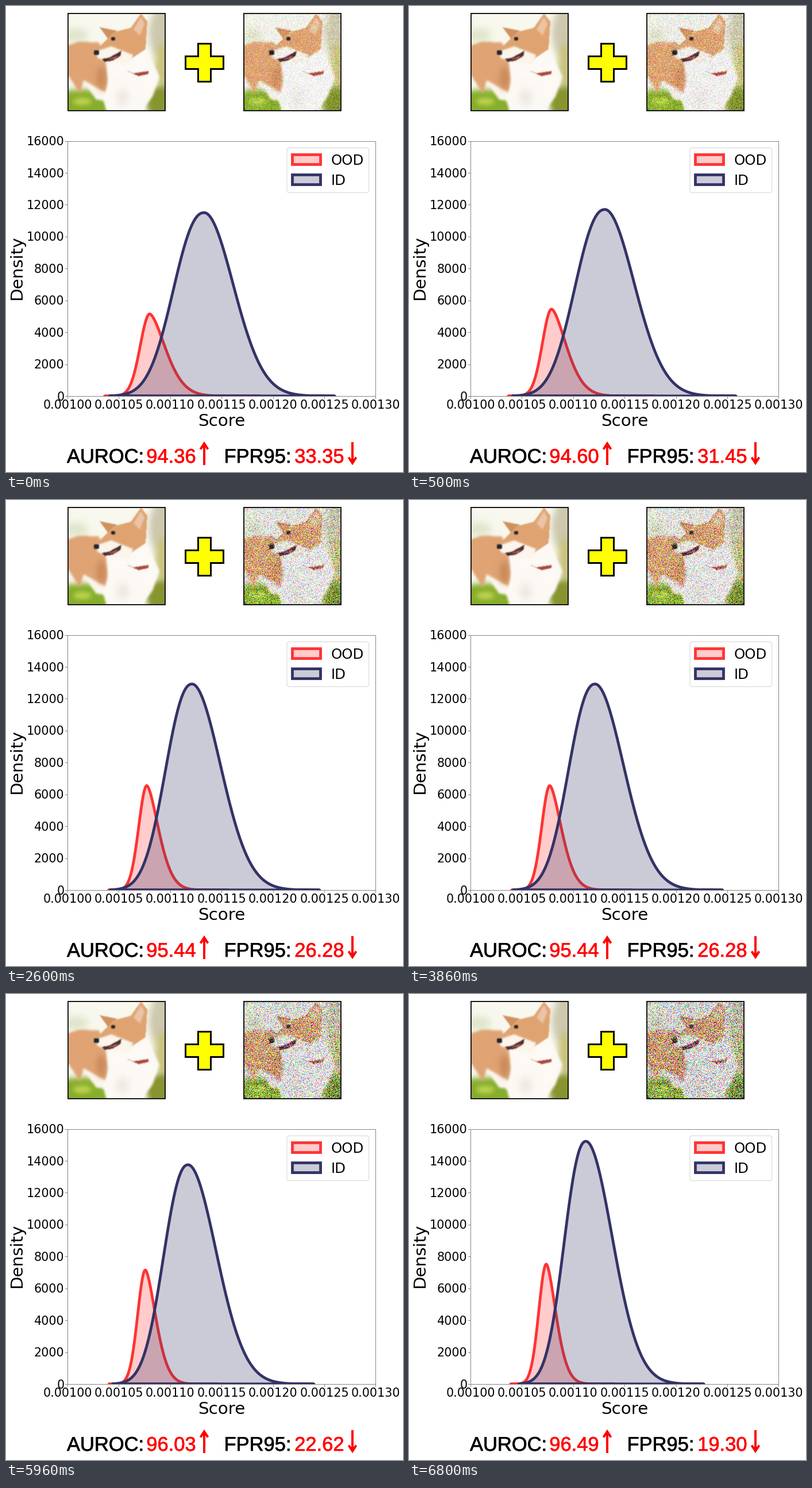
Animation, 691 px wide and 810 px high, one loop 8 s. Source, as a matplotlib script:

```python
import matplotlib.pyplot as plt
import numpy as np
from matplotlib.animation import FuncAnimation
from matplotlib.colors import to_rgb, to_rgba
from matplotlib.patches import FancyBboxPatch, Polygon, Rectangle
from matplotlib.path import Path
from matplotlib.patheffects import withStroke

WIDTH, HEIGHT, DPI = 691, 810, 64
PX = 72 / DPI  # points per pixel
INTERVAL, LOOP = 100, 8000
LEFT, RIGHT, TOP, BASE = 107, 643.5, 234.5, 678
MAX_SCORE, MAX_DENSITY = 300, 16000  # scores in millionths above 0.001
RED, NAVY, GRAY = "#ff3333", "#333366", "#858585"
PHOTO = 168

# start ms, AUROC, FPR95, OOD peak (score, density), ID peak (score, density)
STAGES = [
    (0, 94.36, 33.35, (80.0, 5150), (133.1, 11500)),
    (500, 94.60, 31.45, (78.9, 5450), (130.9, 11700)),
    (2600, 95.44, 26.28, (77.2, 6550), (121.3, 12920)),
    (4700, 96.03, 22.62, (75.8, 7150), (117.4, 13750)),
    (6800, 96.49, 19.30, (73.8, 7520), (112.4, 15220)),
]


def bell(peak, area, left_share, powers, reach):
    """Skewed bell whose half-height width follows from its area and height."""
    center, height = peak
    width = area / height
    left, right = width * left_share, width * (1 - left_share)
    score = np.linspace(center - reach[0] * left, center + reach[1] * right, 400)
    offset = score - center
    side = offset > 0
    ratio = np.abs(offset) / np.where(side, right, left)
    value = height * 0.5 ** (ratio ** np.where(side, powers[1], powers[0]))
    return np.column_stack([LEFT + (RIGHT - LEFT) * score / MAX_SCORE,
                            BASE + (TOP - BASE) * value / MAX_DENSITY])


def blur(mask, sigma):
    r = int(3 * sigma) + 1
    kernel = np.exp(-0.5 * (np.arange(-r, r + 1) / sigma) ** 2)
    kernel /= kernel.sum()
    for axis in (0, 1):
        pad = [(r, r) if a == axis else (0, 0) for a in (0, 1)]
        mask = np.apply_along_axis(np.convolve, axis, np.pad(mask, pad, "edge"),
                                   kernel, "valid")
    return mask


def paint_dog():
    """A dog on grass, in soft flat shapes on a square of PHOTO pixels."""
    v, u = np.mgrid[0:PHOTO, 0:PHOTO] + 0.5
    grid = np.column_stack([u.ravel(), v.ravel()])
    image = np.ones((PHOTO, PHOTO, 3)) * to_rgb("#f8f8ee")

    def shape(color, points, soft=1.0):
        mask = Path(points).contains_points(grid).reshape(PHOTO, PHOTO).astype(float)
        mask = blur(mask, soft)[..., None]
        image[:] = image * (1 - mask) + np.array(to_rgb(color)) * mask

    def oval(color, x, y, rx, ry, soft=1.0):
        a = np.linspace(0, 2 * np.pi, 40)
        shape(color, np.column_stack([x + rx * np.cos(a), y + ry * np.sin(a)]), soft)

    # Garden
    oval("#dfe6cc", 14, 38, 20, 12, 6)
    oval("#cdc8ae", 158, 34, 18, 40, 6)
    oval("#c8c27c", 164, 92, 14, 40, 6)
    oval("#86ad2c", 26, 156, 70, 24, 5)
    oval("#87942f", 160, 152, 26, 26, 5)
    oval("#c3d650", 24, 153, 16, 6, 4)

    # Body and chest
    shape("#fbf6ee", [(22, 112), (66, 112), (74, 152), (48, 150)], 2)
    shape("#e0a474", [(-3, 56), (18, 49), (52, 50), (70, 80), (66, 138), (26, 116),
                      (20, 140), (-3, 104)], 2)
    oval("#c98a5a", 57, 112, 8, 20, 5)
    shape("#fdfaf6", [(64, 80), (132, 54), (158, 110), (146, 144), (128, 170),
                      (66, 170), (60, 150), (70, 120)], 2)
    oval("#ece6de", 94, 146, 10, 16, 7)

    # Head
    shape("#d0915e", [(54, 24), (84, 30), (70, 46)])
    shape("#dfa472", [(46, 66), (66, 46), (80, 32), (108, 25), (126, 0), (137, 14),
                      (134, 62), (104, 82), (64, 80)])
    shape("#ecc5a8", [(113, 28), (126, 6), (132, 18), (124, 38)], 1.5)
    shape("#fbf5ec", [(48, 66), (74, 57), (112, 72), (108, 88), (70, 86), (50, 77)], 1.5)
    shape("#4a2a28", [(58, 79), (70, 77), (92, 65), (90, 74), (76, 82), (62, 84)])
    shape("#c4645c", [(68, 80), (86, 73), (80, 79)])
    oval("#22242c", 48.5, 68, 5, 4.5)
    oval("#2b2220", 77.5, 44, 4, 3.5)
    shape("#a8473c", [(100, 99), (113, 104), (139, 100), (139, 105), (122, 109)])
    return np.clip(image, 0, 1)


fig = plt.figure(figsize=(WIDTH / DPI, HEIGHT / DPI), dpi=DPI, facecolor="white")
ax = fig.add_axes([0, 0, 1, 1])


def text(x, y, label, size, **style):
    style = {"family": "DejaVu Sans", "va": "baseline", **style}
    return ax.text(x, y, label, fontsize=size * PX, **style)


def score_text(x, label="", color="black"):
    return text(x, 794, label, 34.5, family="Liberation Sans", color=color,
                path_effects=[withStroke(linewidth=0.7 * PX, foreground=color)])


def line(points, color, width, **style):
    ax.plot(*zip(*points), color=color, lw=width * PX, **style)


def photo(x, y, pixels):
    image = ax.imshow(pixels, extent=(x, x + PHOTO, y + PHOTO, y),
                      interpolation="nearest", aspect="auto", zorder=1)
    ax.add_patch(Rectangle((x - 0.5, y - 0.5), PHOTO + 1, PHOTO + 1,
                           fill=False, ec="black", lw=1.8 * PX, zorder=2))
    return image


def filled(patch, color):
    patch.set(facecolor=to_rgba(color, 0.25), edgecolor=color, linewidth=4.8 * PX)
    return ax.add_patch(patch)


def density(color):
    curve = Polygon([(LEFT, BASE), (RIGHT, BASE)], joinstyle="round", zorder=3)
    filled(curve, color).set_clip_path(plot_area)
    return curve


# Pictures and plus sign
dog = paint_dog()
grain = np.random.default_rng(7).normal(size=dog.shape)
photo(109, 13, dog)
noisy_photo = photo(414.5, 13, dog)
arm, tip = 11, 33
corner = [(arm, tip), (arm, arm), (tip, arm)]
plus = [(345.5 + sx * x, 97.5 + sy * y)
        for sx, sy, step in ((1, 1, 1), (1, -1, -1), (-1, -1, 1), (-1, 1, -1))
        for x, y in corner[::step]]
ax.add_patch(Polygon(plus, fc="#ffff00", ec="black", lw=3 * PX))

# Chart
plot_area = ax.add_patch(Rectangle((LEFT, TOP), RIGHT - LEFT, BASE - TOP,
                                   fill=False, ec=GRAY, lw=PX, zorder=4))
ood_curve, id_curve = density(RED), density(NAVY)
for k in range(9):
    y = BASE + (TOP - BASE) * k / 8
    line([(LEFT - 4, y), (LEFT, y)], GRAY, 1)
    text(101.5, y + 7.6, str(2000 * k), 20.8, ha="right")
for k in range(7):
    x = LEFT + (RIGHT - LEFT) * k / 6
    line([(x, BASE), (x, BASE + 4)], GRAY, 1)
    text(x, 700.5, f"{0.001 + 0.00005 * k:.5f}", 20.8, ha="center")
text(375.3, 729.5, "Score", 29.4, ha="center")
text(27, 455, "Density", 29.4, ha="center", rotation=90, rotation_mode="anchor")

# Legend
ax.add_patch(FancyBboxPatch((493, 250.5), 134.5, 70, boxstyle="round,pad=4,rounding_size=4",
                            fc="white", ec="#d8d8d8", lw=1.1 * PX, zorder=4))
for label, color, y in (("OOD", RED, 257.5), ("ID", NAVY, 292.5)):
    filled(Rectangle((498.5, y), 48.5, 17.5, zorder=5), color)
    text(565.5, y + 18.5, label, 24.5, zorder=5)

# Scores
score_text(106, "AUROC:")
score_text(379.5, "FPR95:")
auroc_text = score_text(244.3, color="red")
fpr_text = score_text(502.2, color="red")
for x, tail, head in ((345, 797.5, 760.5), (603, 758, 794.5)):
    wing = head + (10 if tail > head else -10)
    for points in ([(x, tail), (x, head)],
                   [(x - 6.5, wing), (x, head), (x + 6.5, wing)]):
        line(points, "red", 4, solid_capstyle="butt", solid_joinstyle="miter")

ax.set(xlim=(0, WIDTH), ylim=(HEIGHT, 0))
ax.axis("off")


def scene(auroc, fpr, ood_peak, id_peak):
    first, last = STAGES[0][1], STAGES[-1][1]
    progress = (auroc - first) / (last - first)
    noise = 0.1 + 0.33 * progress
    return (f"{auroc:.2f}", f"{fpr:.2f}", np.clip(dog + noise * grain, 0, 1),
            bell(ood_peak, 148500, 0.38 + 0.06 * progress, (1.95, 1.65), (4, 6)),
            bell(id_peak, 769000 + 52000 * progress, 0.5 - 0.06 * progress,
                 (2.25, 1.95), (2.75, 3.8)))


SCENES = [scene(*stage[1:]) for stage in STAGES]
STARTS = [stage[0] for stage in STAGES]


def update(frame):
    index = np.searchsorted(STARTS, frame * INTERVAL, "right") - 1
    auroc, fpr, pixels, ood, id_ = SCENES[index]
    auroc_text.set_text(auroc)
    fpr_text.set_text(fpr)
    noisy_photo.set_data(pixels)
    ood_curve.set_xy(ood)
    id_curve.set_xy(id_)
    return auroc_text, fpr_text, noisy_photo, ood_curve, id_curve


anim = FuncAnimation(fig, update, frames=LOOP // INTERVAL, interval=INTERVAL,
                     init_func=lambda: update(0), repeat=True, repeat_delay=0)
plt.show()
```
